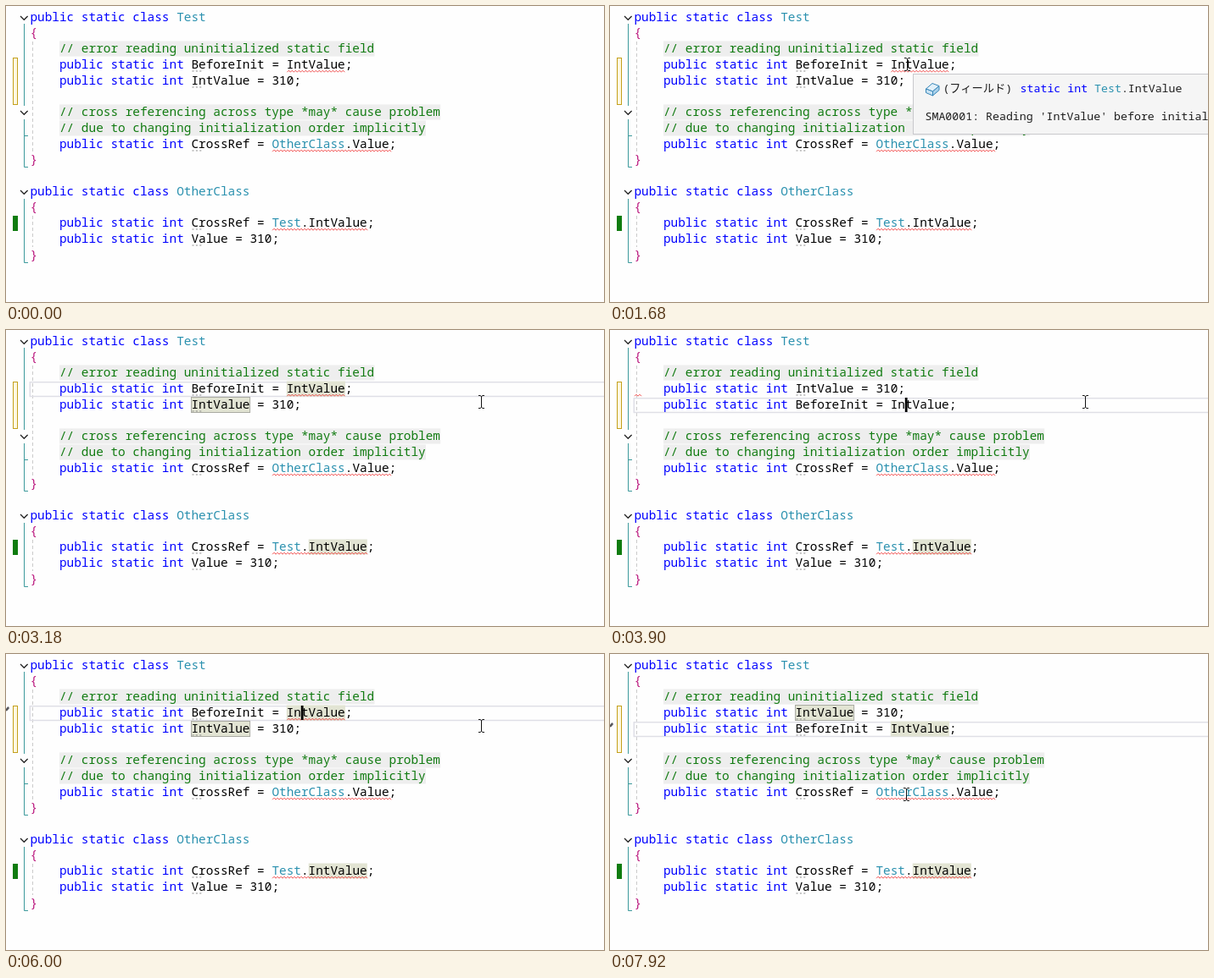
These frames come from a looping animation (705x350 px, 8000 ms). An HTML page:

```html
<!DOCTYPE html>
<html lang="en">
<head>
<meta charset="utf-8">
<title>Static field order</title>
<style>
  html, body { margin: 0; width: 100%; height: 100%; overflow: hidden; background: #fefefe; }
  svg { display: block; width: 705px; height: 350px; }
  text { white-space: pre; font: 14.4px "Noto Sans Mono", monospace; }
  #tip text { font: 13.25px "Noto Sans Mono", "Noto Sans CJK JP", "Noto Sans CJK", monospace; fill: #1e1e1e; }
  .keyword { fill: #0000ff; }
  .type { fill: #2b91af; }
  .comment { fill: #117b11; }
  .brace { fill: #b9147c; }
  .mark { fill: #e2e4d3; }
  .shade { fill: #eeeeee; }
  .fold { fill: none; stroke: #3d9a9c; }
  .chevron { fill: none; stroke: #222; stroke-width: 1.3; }
  .guide { stroke: #cbcbcb; stroke-dasharray: 4 3; }
  .dots { stroke: #8c8c8c; stroke-width: 1.2; stroke-dasharray: 2 2.4; }
  .squiggle { fill: none; stroke: #f03a3a; stroke-width: 0.9; }
</style>
</head>
<body>
<svg id="stage" viewBox="0 0 705 350"></svg>
<script>
const LOOP = 8000, STEP = 60, CHAR = 8.64, ROW = 18.74;
const colX = col => 28.4 + col * CHAR;
const rowY = row => Math.floor(4.1 + row * ROW);

const paint = source => source
  .replace(/\/\/.*|\b(?:public|static|class|int)\b|\b(?:Test|OtherClass)\b|[{}]/g, word => {
    const kind = word.startsWith('//') ? 'comment' : /[{}]/.test(word) ? 'brace'
      : /^[A-Z]/.test(word) ? 'type' : 'keyword';
    return `<tspan class="${kind}">${word}</tspan>`;
  });
const code = (col, source) => `<text x="${colX(col)}" y="14">${paint(source)}</text>`;
const block = (col, length, cls, extra = '') =>
  `<rect class="${cls}" x="${colX(col)}" y="0.5" width="${length * CHAR}" height="18" ${extra}/>`;
const dots = (col, extra = '') =>
  `<path class="dots" ${extra} d="M${colX(col) + 1} 17h11"/>`;
const squiggle = (col, length, extra = '') => {
  let d = `M${colX(col) + 0.6} 18.2`;
  for (let i = 0; i < Math.round(length * CHAR / 4); i++) d += 'l2 -2l2 2';
  return `<path class="squiggle" ${extra} d="${d}"/>`;
};
const line = (row, content, id = '') =>
  `<g id="${id}" transform="translate(0 ${rowY(row)})">${content}</g>`;
const comment = (row, source) => line(row, block(4, source.length, 'shade') + code(4, source));
const chevron = row =>
  `<path class="chevron" d="M17 ${rowY(row) + 8}l4.3 4.3 4.3 -4.3"/>`;

document.getElementById('stage').innerHTML = `
  <rect x="8.5" y="61.5" width="5" height="55" fill="#fff9e0" stroke="#c3a01c"/>
  <rect x="8" y="248" width="6" height="18" fill="#107c10"/>
  <path class="fold" d="M21.5 21V118M21.5 134V190.5H26M21.5 153.5H26M21.5 228V303.5H26"/>
  <path class="guide" d="M31.5 42V173M31.5 248V285"/>
  ${chevron(0)}${chevron(6)}${chevron(11)}
  ${line(0, code(0, 'public static class Test'))}
  ${line(1, code(0, '{'))}
  ${comment(2, '// error reading uninitialized static field')}
  ${line(3, `
    <g id="current">
      <rect x="28.3" y="1.7" width="690" height="16.8" fill="none" stroke="#dfdfe6" stroke-width="1.5"/>
    </g>
    ${block(35, 8, 'mark', 'id="useMark"')}
    ${dots(22, 'id="beforeDots"')}${squiggle(35, 8, 'id="error"')}
    ${code(4, 'public static int BeforeInit = IntValue;')}
    <rect id="caret" x="347.8" y="1" width="2.8" height="17"/>
    <path id="action" d="M0 4.5L2.5 2L4 4L1.5 7L0 7.5Z" fill="#55555a"/>`, 'before')}
  ${line(4, `
    ${block(22, 8, 'mark', 'id="fieldMark" stroke="#a9aaa2"')}
    ${dots(22)}${dots(0, 'id="leftDots"')}${squiggle(0, 0.9, 'id="leftError"')}
    ${code(4, 'public static int IntValue = 310;')}`, 'field')}
  ${comment(6, '// cross referencing across type *may* cause problem')}
  ${comment(7, '// due to changing initialization order implicitly')}
  ${line(8, dots(22) + squiggle(33, 16) + code(4, 'public static int CrossRef = OtherClass.Value;'))}
  ${line(9, code(0, '}'))}
  ${line(11, code(0, 'public static class OtherClass'))}
  ${line(12, code(0, '{'))}
  ${line(13, block(38, 8, 'mark', 'id="otherMark"') + dots(22) + squiggle(33, 13)
    + code(4, 'public static int CrossRef = Test.IntValue;'))}
  ${line(14, dots(22) + code(4, 'public static int Value = 310;'))}
  ${line(15, code(0, '}'))}
  <g id="tip">
    <rect x="357.5" y="80.5" width="360" height="71" fill="#f5f5f5" stroke="#c8c8cc"/>
    <g stroke="#3585b8" stroke-linejoin="round">
      <path d="M372.5 98L380 91.5L388 94.5L380.5 101Z" fill="#e2f0f9"/>
      <path d="M372.5 98L380.5 101V106L372.5 102.5Z" fill="#c9e2f2"/>
      <path d="M380.5 101L388 94.5V99.5L380.5 106Z" fill="#a9d0e9"/>
    </g>
    <text x="392.4" y="102">(フィールド)</text>
    <text x="483.6" y="102">${paint('static int Test.IntValue')}</text>
    <text x="371.5" y="135">SMA0001: Reading 'IntValue' before initialization</text>
  </g>
  <path id="mouse" fill="none" stroke="#111"
    d="M-3 -7.5H-1L0.5 -6.5L2 -7.5H4M0.5 -6.5V6.5M-3 7.5H-1L0.5 6.5L2 7.5H4"/>`;

const parts = {};
document.querySelectorAll('#stage [id]').forEach(el => { if (el.id) parts[el.id] = el; });
const show = (name, on) => parts[name].setAttribute('visibility', on ? 'visible' : 'hidden');
const move = (name, x, y) => parts[name].setAttribute('transform', `translate(${x} ${y})`);

// Pointer moves: start, end, from, to, sideways bend
const moves = [
  [300, 960, [664, 47], [332, 67], 29],
  [1260, 1560, [332, 67], [350, 69], 0],
  [2760, 2940, [350, 69], [560, 85], 0],
  [7500, 7920, [560, 85], [349, 166], 0]
];
const swaps = [[3900, 4380], [4980, 5520], [6240, 6780]];
const blinks = [2640, 3180, 3660, 4440, 4920, 5520, 6000, 6840, 7260, 7800];
const actions = [[3660, 3900], [4920, 4980], [6000, 6240], [7260, LOOP]];
const within = (t, [from, to]) => t >= from && t < to;

function pointer(t) {
  const [start, end, a, b, bend] = moves.filter(m => t >= m[0]).pop() || moves[0];
  const p = Math.min(1, Math.max(0, (t - start) / (end - start)));
  const e = p * p * (3 - 2 * p);
  const x = a[0] + (b[0] - a[0]) * e;
  const y = a[1] + (b[1] - a[1]) * e + bend * Math.sin(Math.PI * e);
  return [Math.round(x), Math.round(y)];
}

function render(t) {
  const swapped = swaps.filter(s => t >= s[0]).length % 2 === 1;
  const settling = swaps.find(s => within(t, s));
  const marked = t >= 3180 && !settling;

  move('before', 0, rowY(swapped ? 4 : 3));
  move('field', 0, rowY(swapped ? 3 : 4));
  show('current', t >= 2640);
  show('caret', blinks.filter(b => t >= b).length % 2 === 1);
  show('action', actions.some(a => within(t, a)));
  show('useMark', marked);
  show('fieldMark', marked);
  show('otherMark', marked || (settling && t < settling[0] + STEP));
  show('beforeDots', !settling);
  show('error', !swapped && !settling);
  show('leftError', settling && swapped);
  show('leftDots', settling && !swapped);
  show('tip', within(t, [1560, 2640]));
  show('mouse', t >= 360);
  move('mouse', ...pointer(t - t % STEP));
}

const begin = performance.now();
(function tick() {
  render((performance.now() - begin) % LOOP);
  requestAnimationFrame(tick);
})();
</script>
</body>
</html>
```
